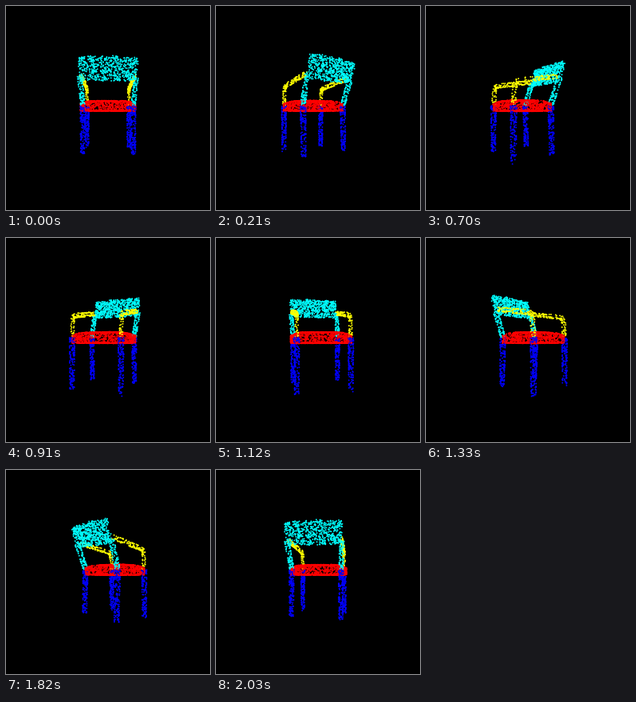
A matplotlib script that plays this animation: 256 by 256 pixels, repeating every 2.1 s.

```python
import numpy as np
import matplotlib.pyplot as plt
from matplotlib.animation import FuncAnimation

SIZE, DPI = 256, 100
FRAMES, STEP_MS = 30, 70
CAM = 240            # camera distance from the turning axis
DOT = 1.9            # dot diameter in pixels
rng = np.random.default_rng(7)


def lean(h):
    """Depth of the sloping backrest at height h."""
    return 14 + (h - 4) * 0.335


def tube(path, n, rx, rn, taper=1):
    """Random points on a tube of oval section along a polyline of (x, h, z)."""
    path = np.array(path, float)
    step = np.diff(path, axis=0)
    length = np.linalg.norm(step, axis=1)
    s = np.r_[0, np.cumsum(length)] / length.sum()
    t = rng.random(n)
    core = np.stack([np.interp(t, s, c) for c in path.T], axis=1)
    k = np.searchsorted(s, t, side="right") - 1
    normal = np.stack([0 * length, -step[:, 2], step[:, 1]], axis=1)
    normal /= length[:, None]
    phi = rng.uniform(0, 2 * np.pi, n)
    size = 1 + (taper - 1) * t
    core += (rn * np.sin(phi) * size)[:, None] * normal[k]
    core[:, 0] += rx * np.cos(phi) * size
    return core


def seat(n_top, n_under, n_side):
    a, b, mid, p = 34, 26.5, -10.5, 6
    u, v = rng.uniform(-1, 1, (2, n_top + n_under))
    m = (np.abs(u) ** p + np.abs(v) ** p) ** (1 / p)
    u, v, m = u / np.maximum(m, 1), v / np.maximum(m, 1), np.minimum(m, 1)
    h = 9.2 - 4.5 * m ** 6
    h[n_top:] = -3.6
    ang = rng.uniform(0, 2 * np.pi, n_side)
    c, s = np.cos(ang), np.sin(ang)
    k = (np.abs(c) ** p + np.abs(s) ** p) ** (-1 / p)
    x = np.r_[u, c * k] * a
    z = np.r_[v, s * k] * b + mid
    return np.stack([x, np.r_[h, rng.uniform(-3.8, 5.5, n_side)], z], axis=1)


def panel(n):
    u, t = rng.uniform(-1, 1, n), rng.random(n)
    h = 31 + t * (25.8 - 1.3 * u ** 2)
    z = lean(h) + 2.4 * np.sin(rng.uniform(0, 2 * np.pi, n))
    return np.stack([u * (31.5 + 1.8 * t), h, z], axis=1)


def chair():
    parts = [("#ff0000", seat(400, 320, 420)), ("#00ffff", panel(600))]
    for x in (-30, 30):
        k = x / 30
        parts += [
            ("#0000ff", tube([(x, 3, -34.5), (x, -57, -34.5)],
                             150, 2.8, 3.4, 0.8)),
            ("#0000ff", tube([(x, 3, 13), (x, -55, 14.5)],
                             150, 2.8, 3.5, 0.8)),
            ("#00ffff", tube([(x, 4, 13), (32 * k, 36, lean(36))],
                             85, 2.4, 3.2)),
            ("#ffff00", tube([(31 * k, 37, 21), (30 * k, 29, -28),
                              (30 * k, 26, -33), (x, 4, -34)],
                             130, 1.6, 2.6)),
        ]
    pts = np.concatenate([p for _, p in parts])
    cols = np.concatenate([[c] * len(p) for c, p in parts])
    return pts, cols


pts, cols = chair()

fig = plt.figure(figsize=(SIZE / DPI, SIZE / DPI), dpi=DPI, facecolor="black")
ax = fig.add_axes([0, 0, 1, 1])
ax.set(xlim=(0, SIZE), ylim=(SIZE, 0))
ax.axis("off")
dots = ax.scatter(pts[:, 0], pts[:, 1], s=(DOT * 72 / DPI) ** 2, marker="o",
                  c=cols, linewidths=0)


def update(i):
    a = 2 * np.pi * i / FRAMES
    x, h, z = pts.T
    depth = z * np.cos(a) - x * np.sin(a)
    scale = CAM / (CAM - depth)
    xy = np.stack([x * np.cos(a) + z * np.sin(a), -h], axis=1)
    xy = SIZE / 2 + xy * scale[:, None]
    order = np.argsort(depth)
    dots.set_offsets(xy[order])
    dots.set_facecolor(cols[order])
    return dots,


anim = FuncAnimation(fig, update, frames=FRAMES, interval=STEP_MS,
                     repeat=True, repeat_delay=0, blit=False)
plt.show()
```
